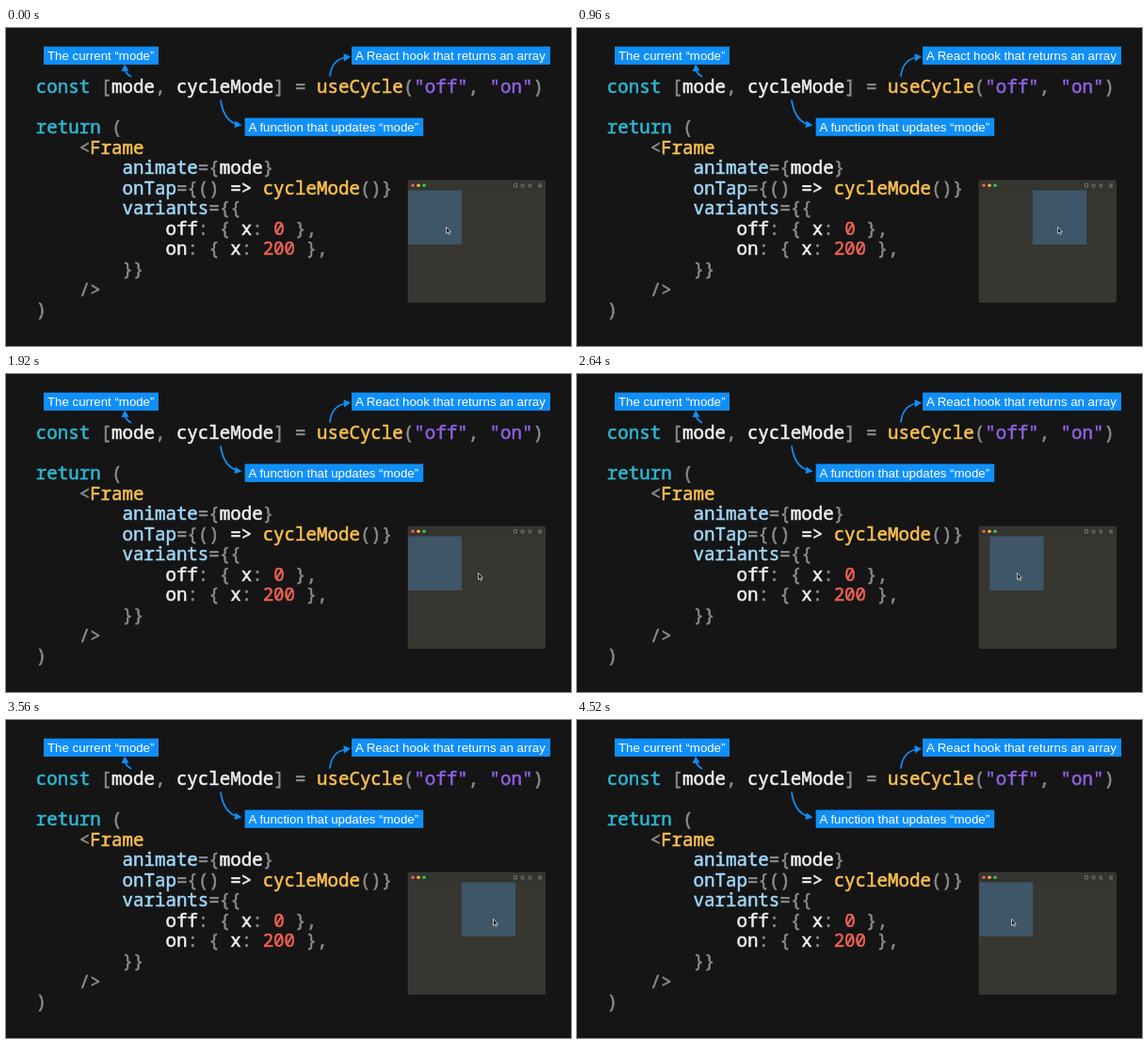
An HTML page for the animation above (4.56 s loop, 600 by 338 pixels).

```html
<!DOCTYPE html>
<html lang="en">
<head>
<meta charset="utf-8">
<title>useCycle</title>
<style>
  html, body { margin: 0; width: 100%; height: 100%; overflow: hidden; background: #151516; }
  svg { display: block; width: 600px; height: 338px; }
  #code text { font: 500 19.12px "Noto Sans Mono", "DejaVu Sans Mono", monospace; white-space: pre; stroke-width: .55; }
  .label { font: 13.25px "Liberation Sans", Arial, sans-serif; fill: #fff; }
  .blue { fill: #108ff8; }
  .arrow { fill: none; stroke: #108ff8; stroke-width: 1.7; stroke-linecap: round; }
  .icon { fill: none; stroke: #8d8c88; stroke-width: .7; }
</style>
</head>
<body>
<svg viewBox="0 0 600 338">
  <rect width="600" height="338" fill="#151516"/>
  <g id="code"></g>

  <path class="arrow" d="M132.500 51.500Q127.500 49 126.500 44"/>
  <path class="blue" d="M126 38.500L122.500 46L130.500 45.500Z"/>
  <path class="arrow" d="M228 77Q231 97 244 102"/>
  <path class="blue" d="M250.500 103.500L242.500 106L243.500 98.500Z"/>
  <path class="arrow" d="M344 51Q346 34 360 31.500"/>
  <path class="blue" d="M366 30.500L358.500 27L359 35.500Z"/>
  <g id="labels"></g>

  <clipPath id="pane"><rect x="427" y="162" width="145.500" height="129.500" rx="1.500"/></clipPath>
  <g clip-path="url(#pane)">
    <rect x="427" y="162" width="146" height="130" fill="#373631"/>
    <rect x="427" y="162" width="146" height="10.500" fill="#343431"/>
    <rect id="box" y="172.500" width="57.300" height="57.500" fill="#3e5668"/>
    <circle cx="432" cy="167.200" r="1.800" fill="#f25a50"/>
    <circle cx="438" cy="167.200" r="1.800" fill="#f3b52f"/>
    <circle cx="444" cy="167.200" r="1.800" fill="#37c840"/>
    <path class="icon" d="M539.500 165.500h3v3.500h-3zM547 166h3v3h-3zM555 166h2.500v3h-2.500zM565 166h4M565 167.500h4M565 169h4"/>
  </g>
  <rect x="427" y="162" width="145.500" height="129.500" rx="1.500" fill="none" stroke="#484742" stroke-width=".5"/>
  <path id="cursor" d="M0 0V7L1.600 5.600L2.700 8L3.900 7.500L2.900 5.200H4.900Z" fill="#181818" stroke="#d8d8d8" stroke-width=".8"/>
</svg>
<script>
const $ = id => document.getElementById(id);

function add(parent, tag, attrs, text = '') {
  const el = document.createElementNS('http://www.w3.org/2000/svg', tag);
  for (const k in attrs) el.setAttribute(k, attrs[k]);
  el.textContent = text;
  parent.append(el);
}

const colors = { c: '#2cb9d3', g: '#8b8b8b', w: '#f0eff0', y: '#fcc04e', p: '#8f62e3', b: '#9fd7f8', r: '#ef6250' };

// Each line: row, column, then colour key and text pairs
const lines = [
  [0, 0, 'c', 'const ', 'g', '[', 'w', 'mode', 'g', ', ', 'w', 'cycleMode', 'g', '] = ', 'y', 'useCycle', 'g', '(',
    'p', '"off"', 'g', ', ', 'p', '"on"', 'g', ')'],
  [2, 0, 'c', 'return ', 'g', '('],
  [3, 4, 'g', '<', 'y', 'Frame'],
  [4, 8, 'b', 'animate', 'g', '={', 'w', 'mode', 'g', '}'],
  [5, 8, 'b', 'onTap', 'g', '={() ', 'w', '=> ', 'y', 'cycleMode', 'g', '()}'],
  [6, 8, 'b', 'variants', 'g', '={{'],
  [7, 12, 'w', 'off', 'g', ': { ', 'w', 'x', 'g', ': ', 'r', '0 ', 'g', '},'],
  [8, 12, 'w', 'on', 'g', ': { ', 'w', 'x', 'g', ': ', 'r', '200 ', 'g', '},'],
  [9, 8, 'g', '}}'],
  [10, 4, 'g', '/>'],
  [11, 0, 'g', ')']
];
for (const [row, start, ...parts] of lines) {
  let col = start;
  for (let i = 0; i < parts.length; i += 2) {
    const fill = colors[parts[i]];
    add($('code'), 'text', { x: 31.8 + col * 11.47, y: 69.2 + row * 21.53, fill, stroke: fill }, parts[i + 1]);
    col += parts[i + 1].length;
  }
}

for (const [x, y, width, text] of [
  [40, 19.7, 122, 'The current “mode”'],
  [253.6, 95.6, 189.6, 'A function that updates “mode”'],
  [367, 19.7, 211, 'A React hook that returns an array']
]) {
  add($('labels'), 'rect', { x, y, width, height: 19.2, class: 'blue' });
  add($('labels'), 'text', { x: x + 4, y: y + 14, class: 'label' }, text);
}

const LOOP = 4560;
const taps = [340, 1440, 2608, 3710];
// Cursor moves: start, end, from x, to x
const moves = [
  [560, 940, 467.5, 510.5],
  [1780, 2260, 510.5, 467.5],
  [2800, 3380, 467.5, 517.5],
  [3960, 4500, 517.5, 461.5]
];

// Step response of a spring with stiffness 500, damping 25, mass 1
function spring(s) {
  if (s <= 0) return 0;
  const decay = 12.5, w = Math.sqrt(500 - decay * decay);
  return 1 - Math.exp(-decay * s) * (Math.cos(w * s) + decay / w * Math.sin(w * s));
}

function smooth(p) {
  p = Math.min(1, Math.max(0, p));
  return p * p * (3 - 2 * p);
}

function draw(now) {
  const t = now % LOOP;
  const on = taps.reduce((sum, tap, i) => sum + (i % 2 ? -1 : 1) * spring((t - tap) / 1000), 0);
  const x = moves.reduce((sum, [a, b, from, to]) => sum + (to - from) * smooth((t - a) / (b - a)), 467.5);
  $('box').setAttribute('x', 426.8 + 57 * on);
  $('cursor').setAttribute('transform', `translate(${x} 211.5)`);
  requestAnimationFrame(draw);
}
draw(0);
</script>
</body>
</html>
```
